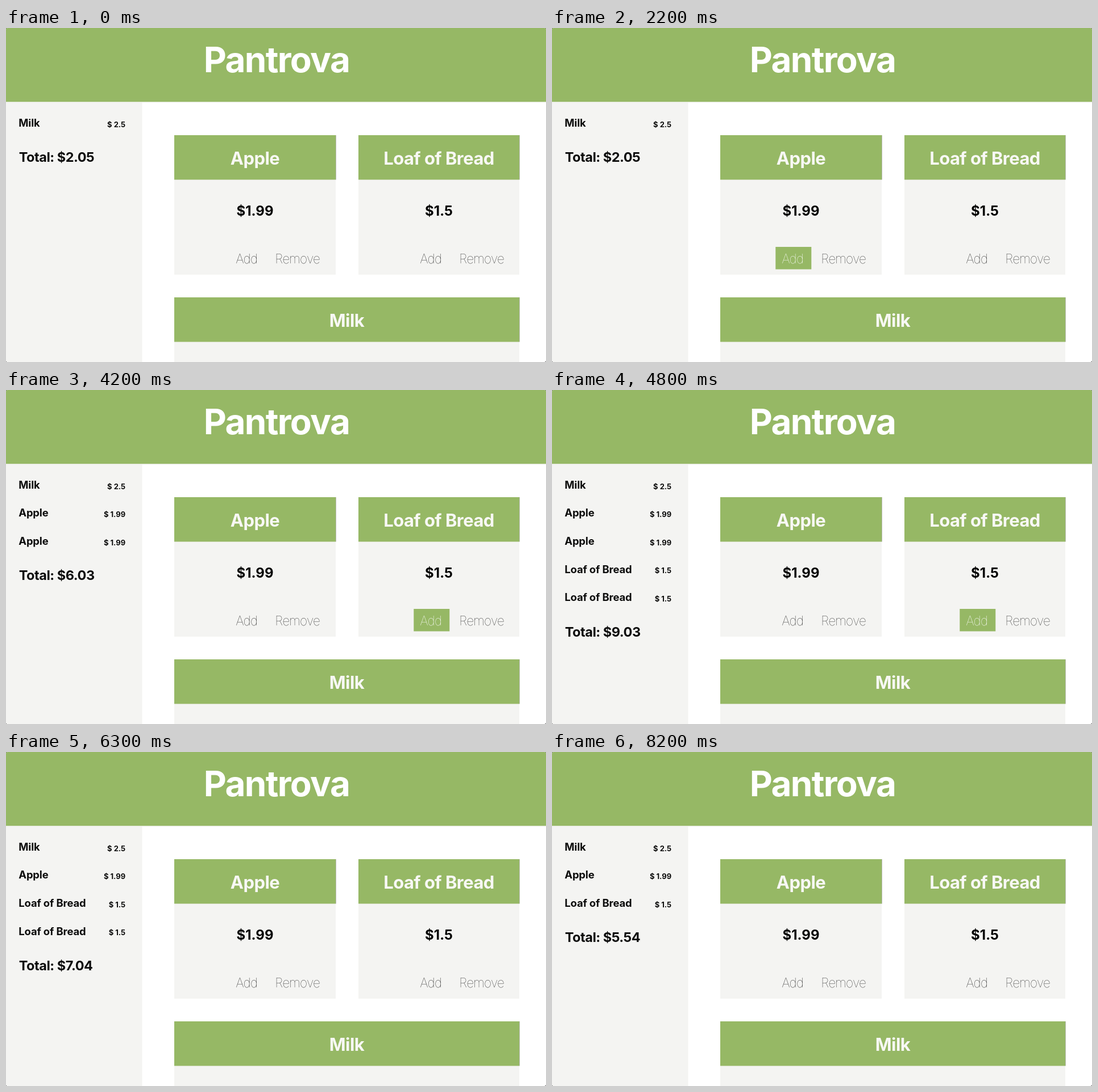
Write an HTML page that moves like this. It is 950 px wide and 589 px high and loops after 8.3 s.

```html
<!DOCTYPE html>
<html lang="en">
<head>
<meta charset="utf-8">
<title>Pantrova</title>
<style>
  html, body { margin: 0; width: 100%; height: 100%; overflow: hidden; background: #555; }
  svg { display: block; width: 950px; height: 589px; border-radius: 3px; background: #fff; }
  text { font-family: Inter, "Open Sans", sans-serif; font-optical-sizing: none; font-weight: 700; fill: #0c0c0c; }
  .mid { text-anchor: middle; }
  .green { fill: #96b865; }
  .grey { fill: #f4f4f2; }
  .edge { fill: #b9bcb2; }
  .brand { font-size: 62px; letter-spacing: -.027em; fill: #fff; }
  .title { font-size: 31px; letter-spacing: -.018em; fill: #f8f8f5; }
  .price { font-size: 24px; fill: #000; }
  .item { font-size: 18.4px; letter-spacing: -.007em; }
  .cost { font-size: 13px; text-anchor: end; }
  .total { font-size: 23.5px; letter-spacing: -.02em; }
  .button rect { fill: none; }
  .button text { font-size: 22.6px; font-weight: 100; letter-spacing: -.8px; fill: #333; }
  .button.hover rect { fill: #96b865; }
  .button.hover text { fill: #fff; }
</style>
</head>
<body>
<svg id="stage" viewBox="0 0 950 589"></svg>
<script>
const LOOP = 8300;
const ROW = 49.6;
const PRICES = { Milk: 2.5, Apple: 1.99, "Loaf of Bread": 1.5 };

// [start, end, button]
const hovers = [
  [2000, 3600, "Apple Add"],
  [3800, 4900, "Loaf of Bread Add"],
  [5100, 6200, "Apple Remove"],
  [6600, 7900, "Loaf of Bread Remove"]
];

// [time, product, change in count]
const clicks = [
  [2700, "Apple", 1], [3200, "Apple", 1],
  [4400, "Loaf of Bread", 1], [4700, "Loaf of Bread", 1],
  [5700, "Apple", -1], [7300, "Loaf of Bread", -1]
];

const rect = (x, y, w, h, cls) => `<rect x="${x}" y="${y}" width="${w}" height="${h}" class="${cls}"/>`;
const text = (x, y, str, cls) => `<text x="${x}" y="${y}" class="${cls}">${str}</text>`;

function button(x, w, product, label) {
  return `<g class="button" data-id="${product} ${label}">` +
    rect(x, 386, w, 39.5, "") + text(x + 11, 415, label, "") + "</g>";
}

function card(x, y, w, name) {
  return rect(x, y, w, 246, "grey") + rect(x, y, w, 78.5, "green") +
    rect(x + w, y, 1, 78.5, "edge") + text(x + w / 2, y + 51.6, name, "title mid");
}

function product(x, w, name) {
  return card(x, 189, w, name) +
    text(x + w / 2, 331, "$" + PRICES[name], "price mid") +
    button(x + 97.3, 63, name, "Add") + button(x + 166.3, 102, name, "Remove");
}

const stage = document.getElementById("stage");
stage.innerHTML =
  rect(0, 130, 239.5, 459, "grey") +
  rect(0, 130, 950, 1.5, "grey") +
  rect(0, 0, 950, 130.2, "green") +
  text(476, 77.6, "Pantrova", "brand mid") +
  product(296, 284, "Apple") +
  product(620, 283, "Loaf of Bread") +
  card(296, 475, 607, "Milk") +
  '<g id="cart"></g>';

const cart = document.getElementById("cart");
const buttons = document.querySelectorAll(".button");
let shown = "";

function drawCart(t) {
  const items = ["Milk"];
  let total = 2.05;
  for (const [time, name, change] of clicks) {
    if (t < time) break;
    if (change > 0) items.push(name);
    else items.splice(items.indexOf(name), 1);
    total += change * PRICES[name];
  }
  const html = items.map((name, i) =>
    text(22.3, 173.8 + i * ROW, name, "item") +
    text(210.2, 174.5 + i * ROW, "$ " + PRICES[name], "cost")
  ).join("") + text(22.7, 236.2 + (items.length - 1) * ROW, "Total: $" + total.toFixed(2), "total");
  if (html !== shown) cart.innerHTML = shown = html;
}

function frame() {
  const t = performance.now() % LOOP;
  const active = hovers.find(([start, end]) => t >= start && t < end);
  for (const b of buttons) b.classList.toggle("hover", !!active && b.dataset.id === active[2]);
  drawCart(t);
  requestAnimationFrame(frame);
}
frame();
</script>
</body>
</html>
```
